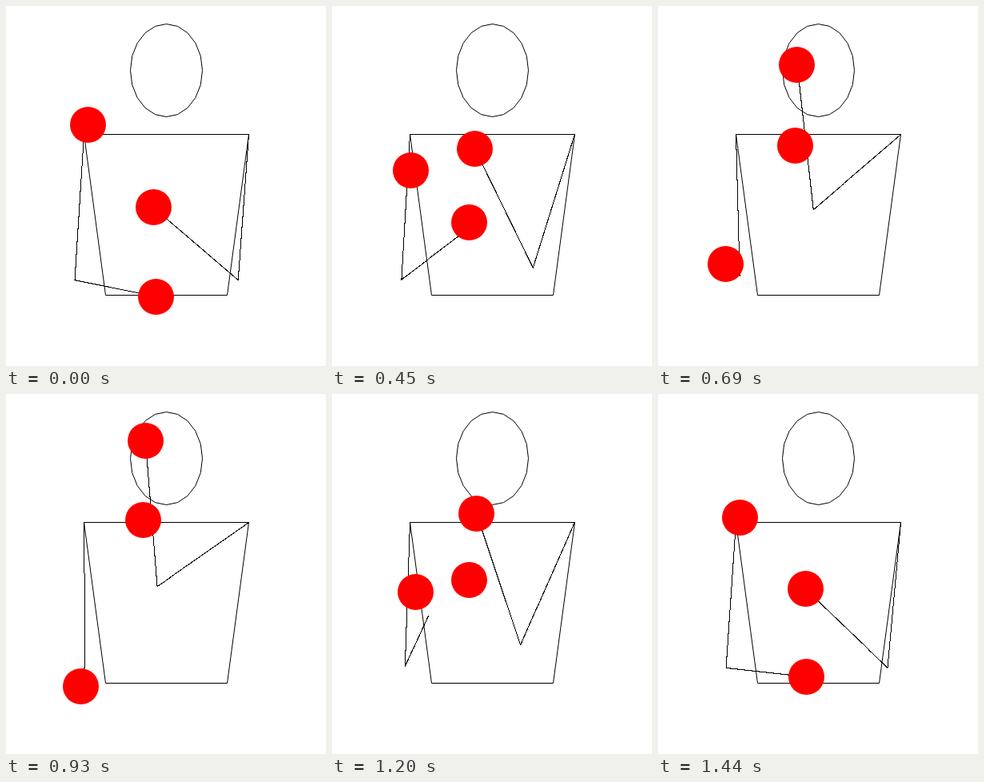
These frames come from a looping animation (400 px wide and 450 px high, 1.47 s). An HTML page with a canvas:

```html
<!DOCTYPE html>
<html lang="en">
<head>
<meta charset="utf-8">
<title>Juggler</title>
<style>
  html, body { margin: 0; overflow: hidden; background: #fff; }
  canvas { display: block; }
</style>
</head>
<body>
<canvas id="stage" width="400" height="450"></canvas>
<script>
const ctx = document.getElementById('stage').getContext('2d');
const LOOP = 1470, STEP = 30;
const GRAVITY = 0.00137; // px per ms²
const ARM = 183.3;       // length of each arm segment
const REACH = 134;       // distance of the hands in front of the body

// Ball flights of the left hand: apex time and height, x at time 0 and its drift
const outer = { release: 1065, caught: 615, apex: 133, top: 136.5, x: 102.5, drift: -0.0083 };
const inner = { release: 330, caught: 1350, apex: 862, top: 154.5, x: 171.5, drift: 0 };

// Flight time relative to the apex wraps around the loop
function flight(ball, t) {
  const fall = (t - ball.apex + LOOP * 1.5) % LOOP - LOOP / 2;
  return [ball.x + ball.drift * (ball.apex + fall), ball.top + GRAVITY / 2 * fall * fall];
}

const at = (ball, event, vx, vy) => [ball[event], ...flight(ball, ball[event]), vx, vy];

// Hand keys: time, position, velocity
const leftHand = curve([
  at(inner, 'release', -0.056, -0.48),
  [450, 164, 283, -0.35, -0.2],
  at(outer, 'caught', -0.249, 0.375),
  at(outer, 'release', 0.052, -0.432),
  [1200, 120.8, 277, 0.35, 0],
  at(inner, 'caught', 0.229, 0.448)
]);
const rightHand = curve([
  [155, 185.2, 273, 0, 0],
  [540, 176, 133.5, -0.02, -0.48],
  [838, 173.5, 50.5, 0, 0],
  [1200, 180.5, 149.5, 0.018, 0.45]
]);

// Closed cubic path through the keys
function curve(keys) {
  return time => {
    const t = time < keys[0][0] ? time + LOOP : time;
    const i = keys.findLastIndex(key => key[0] <= t);
    const a = keys[i], b = keys[(i + 1) % keys.length];
    const span = (b[0] - a[0] + LOOP) % LOOP;
    const u = (t - a[0]) / span, v = 1 - u;
    return [1, 2].map(k =>
      a[k] * v * v * (1 + 2 * u) + b[k] * u * u * (1 + 2 * v) +
      span * u * v * (a[k + 2] * v - b[k + 2] * u));
  };
}

function ballPosition(ball, t) {
  const airTime = (ball.caught - ball.release + LOOP) % LOOP;
  const inAir = (t - ball.release + LOOP) % LOOP < airTime;
  return inAir ? flight(ball, t) : leftHand(t);
}

function polygon(points) {
  ctx.beginPath();
  points.forEach(p => ctx.lineTo(...p));
  ctx.closePath();
  ctx.stroke();
}

// Rough line without smoothing
function roughLine([x0, y0], [x1, y1]) {
  const n = 2 * Math.ceil(Math.max(Math.abs(x1 - x0), Math.abs(y1 - y0), 1));
  for (let i = 0; i <= n; i++) {
    ctx.fillRect(Math.floor(x0 + (x1 - x0) * i / n), Math.floor(y0 + (y1 - y0) * i / n), 1, 1);
  }
}

// Two equal segments; the elbow hangs in the vertical plane through shoulder and hand
function arm(shoulder, hand) {
  const dx = hand[0] - shoulder[0], dy = hand[1] - shoulder[1];
  const flat = Math.hypot(dx, REACH), dist = Math.hypot(flat, dy);
  const droop = Math.sqrt(Math.max(0, ARM * ARM - dist * dist / 4));
  const forward = flat / 2 - droop * dy / dist;
  const elbow = [shoulder[0] + forward * dx / flat, shoulder[1] + dy / 2 + droop * flat / dist];
  roughLine(shoulder, elbow);
  roughLine(elbow, hand);
}

function drawBall([x, y]) {
  ctx.beginPath();
  ctx.arc(Math.floor(x) + 0.5, Math.floor(y) + 0.5, 22.5, 0, 2 * Math.PI);
  ctx.fill();
}

const shoulders = [[97.5, 160.5], [303.5, 160.5]];
const torso = [...shoulders, [276.5, 361.5], [124.5, 361.5]];
const head = Array.from({ length: 20 }, (_, i) => {
  const a = i * Math.PI / 10;
  return [200.5 + 45 * Math.cos(a), 80.5 + 58 * Math.sin(a)];
});

function draw(t) {
  const left = leftHand(t), right = rightHand(t);
  ctx.clearRect(0, 0, 400, 450);
  ctx.fillStyle = '#000';
  polygon(head);
  polygon(torso);
  arm(shoulders[0], left);
  arm(shoulders[1], right);
  ctx.fillStyle = '#f00';
  [ballPosition(outer, t), ballPosition(inner, t), right].forEach(drawBall);
}

let start;
function tick(now) {
  start ??= now;
  draw(Math.floor((now - start) % LOOP / STEP) * STEP);
  requestAnimationFrame(tick);
}
draw(0);
requestAnimationFrame(tick);
</script>
</body>
</html>
```
